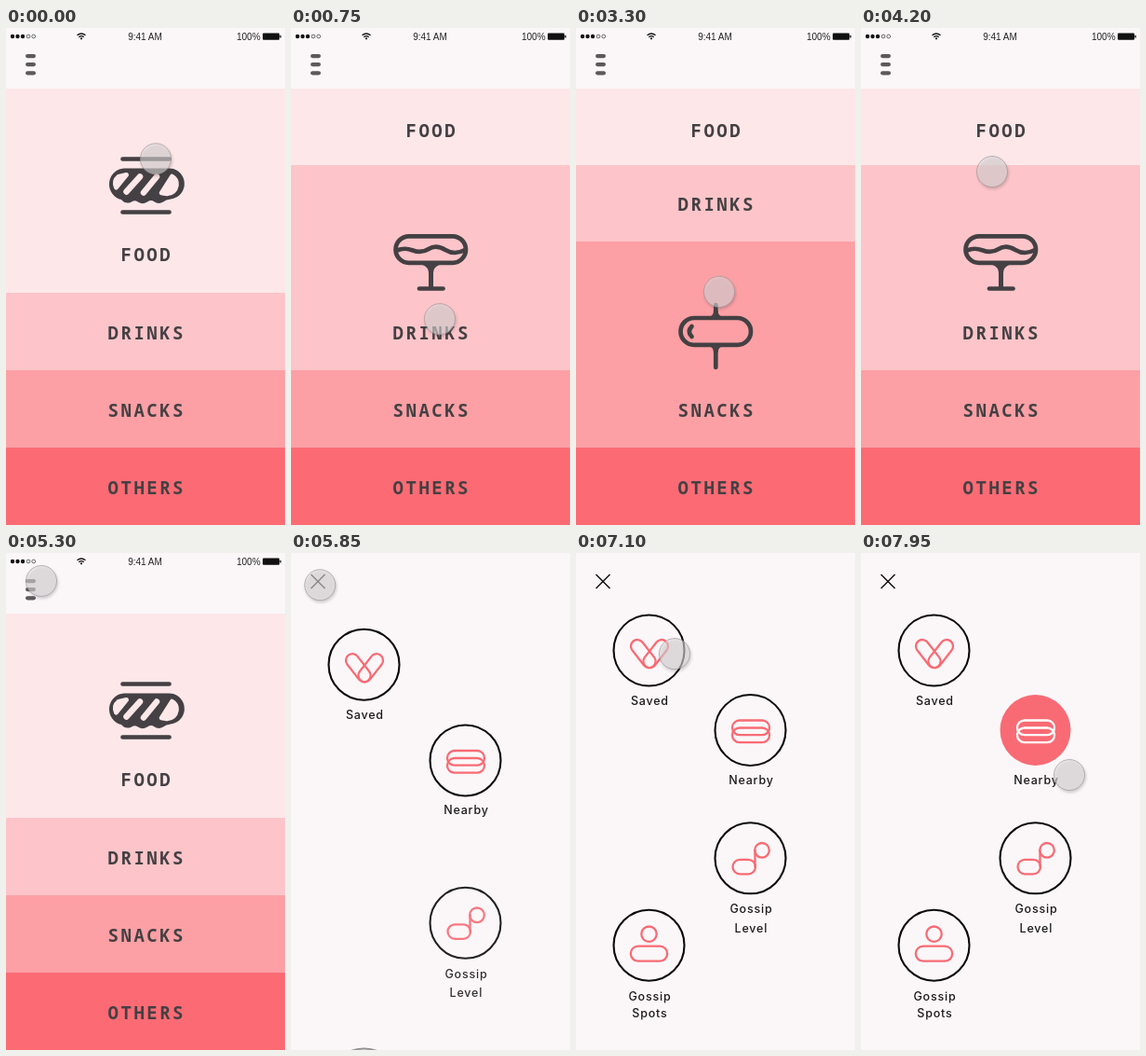
Write an HTML page that moves like this. It is 300 by 533 pixels and loops after 8000 ms.

```html
<!DOCTYPE html>
<html lang="en">
<head>
<meta charset="utf-8">
<title>Food menu</title>
<style>
  html, body { margin: 0; width: 100%; height: 100%; overflow: hidden; background: #fbf7f9; }
  svg { display: block; width: 100%; height: 100%; }
  .status { font: 10px "Liberation Sans", Arial, sans-serif; fill: #222; }
  .label { font: 600 19px "Noto Sans Mono", "DejaVu Sans Mono", monospace; letter-spacing: 2.5px; fill: #444043; text-anchor: middle; }
  .caption { font: 500 12.5px Inter, sans-serif; letter-spacing: .8px; fill: #1c1a1c; text-anchor: middle; }
  .ink { fill: none; stroke: #444043; stroke-width: 4.7; stroke-linecap: round; stroke-linejoin: round; }
  .solid { fill: #444043; stroke: none; }
  .cell { stroke: #fde7e9; fill: #fde7e9; }
  .line { fill: none; stroke-width: 2.3; stroke-linecap: round; }
  #cursor { filter: drop-shadow(1px 2px 1.5px rgba(60, 50, 55, .35)); }
</style>
</head>
<body>
<svg viewBox="0 0 300 533">
  <defs>
    <g id="icon0" class="ink">
      <path d="M125.500 140.500H175.500M125.500 197.500H175.500"/>
      <path class="solid" d="M127 150.500H173.500A16.500 16.500 0 0 1 177 183.500Q172 184 169 186.500Q164 189.500 159 186Q156 184 152 186.500Q146 190 141 186Q138 184 134 187Q128 189 124 184A17 17 0 0 1 127 150.500Z"/>
      <path class="cell" stroke-width="5" d="M121 159.500L129.500 157.500L118.500 171Q115.500 164 121 159.500Z"/>
      <path class="cell" stroke-width="7" style="stroke-width:6.500" d="M129.500 175.500L144 159.500M148 176.500L162 159.500"/>
      <path class="cell" d="M178.500 159Q184 162 183.500 168.500Q182 177 173 178L167 177Z"/>
    </g>
    <g id="icon1" class="ink">
      <rect x="112.500" y="223.300" width="75.500" height="28.600" rx="14.300"/>
      <path d="M114 238.500Q122 235 131 238.500T148 237T166 238T187 238"/>
      <path class="solid" d="M138 253H163Q153 255 153 263V279H148V263Q148 255 138 253Z"/>
      <path d="M138 279.500H163.500"/>
    </g>
    <g id="icon2" class="ink">
      <path d="M150.300 297V310M150.300 342V364"/>
      <path class="solid" d="M142 310Q148 309 148 303H152.600Q152.600 309 159 310ZM142 341Q148 342 148 348H152.600Q152.600 342 159 341Z"/>
      <rect x="112.500" y="311" width="75.500" height="28.800" rx="14.400"/>
      <path d="M124.500 320Q119 325.500 124.500 331"/>
    </g>
    <g id="icon3" class="ink">
      <path d="M121 401C115.500 403 112.500 408 112.500 414A14.500 14.500 0 0 0 127 428.300H173.500A14.600 14.600 0 0 0 173.500 399.200H152Q148.500 399.200 147.500 404Q146 408 142 407Q139 412 133 411Q126 409 125 403Q124 400 121 401Z"/>
      <path class="solid" d="M134 384Q138 388 135.500 390.500Q131 389 134 384ZM141 387Q145 385.500 149 388.500Q146 390 143 392.500Q139.500 391 141 387Z"/>
    </g>
    <g id="saved" class="line">
      <rect x="-7" y="-7" width="34.500" height="14" rx="7" transform="translate(-12.500 -4.500) rotate(52)"/>
      <rect x="-7" y="-7" width="34.500" height="14" rx="7" transform="translate(13.500 -4.500) rotate(128)"/>
    </g>
    <g id="nearby" class="line">
      <rect x="-19.500" y="-10.500" width="40" height="15.700" rx="7.800"/>
      <rect x="-19.500" y="-2.500" width="40" height="15.700" rx="7.800"/>
    </g>
    <g id="level" class="line">
      <circle cx="12.500" cy="-8.500" r="7.800"/>
      <rect x="-19" y="1.500" width="24.500" height="15.500" rx="7.700"/>
      <path d="M5 -8.500V9"/>
    </g>
    <g id="spots" class="line">
      <circle cy="-12" r="8.200"/>
      <rect x="-19.700" y="1" width="39.400" height="16" rx="8"/>
    </g>
  </defs>

  <rect width="300" height="533" fill="#fbf7f9"/>
  <g id="menu"></g>
  <path id="close" d="M21.500 23L36.500 38M36.500 23L21.500 38" stroke="#111" stroke-width="1.500"/>

  <g id="home">
    <rect width="300" height="66" fill="#fbf7f9"/>
    <g fill="#111">
      <circle cx="7" cy="9" r="2.200"/><circle cx="12.500" cy="9" r="2.200"/><circle cx="18" cy="9" r="2.200"/>
      <g fill="none" stroke="#333" stroke-width=".7"><circle cx="24" cy="9" r="1.900"/><circle cx="29.700" cy="9" r="1.900"/></g>
      <path d="M76.500 7.800Q81 4.200 85.500 7.800M78.300 9.700Q81 7.600 83.700 9.700" fill="none" stroke="#111" stroke-width="1.300"/>
      <circle cx="81" cy="11.300" r="1.100"/>
      <rect x="276" y="5.500" width="18" height="7.300" rx="1"/><rect x="294.500" y="7.700" width="1.300" height="3" rx=".6"/>
    </g>
    <text class="status" x="149.500" y="12.500" text-anchor="middle">9:41 AM</text>
    <text class="status" x="248" y="12.500">100%</text>
    <g fill="#5d585c">
      <rect x="21" y="28" width="11" height="4.200" rx="2.100"/>
      <rect x="21" y="37" width="11" height="4.200" rx="2.100"/>
      <rect x="21" y="46.200" width="11" height="4.200" rx="2.100"/>
    </g>
    <g id="panels"></g>
  </g>

  <circle id="cursor" r="16.500" fill="#e3dfe2" fill-opacity=".57" stroke="#9c9699" stroke-opacity=".75" stroke-width=".9"/>
</svg>
<script>
const LOOP = 8000, PINK = '#f96b74';
const $ = id => document.getElementById(id);
const lerp = (a, b, k) => a + (b - a) * k;
const progress = (t, start, length) => {
  const k = Math.min(1, Math.max(0, (t - start) / length));
  return k * k * (3 - 2 * k);
};
const move = (node, x, y) => node.setAttribute('transform', `translate(${x} ${y})`);

// low/high: panel top when the panels above are open/closed; base: label baselines
const panels = [
  { name: 'FOOD', color: '#fde7e9', low: 65, high: 65, base: [250, 117] },
  { name: 'DRINKS', color: '#fdc5c9', low: 284, high: 147, base: [334, 196], raise: 470, lower: 4230 },
  { name: 'SNACKS', color: '#fca0a5', low: 367, high: 229, base: [417, 278], raise: 1120, lower: 3670 },
  { name: 'OTHERS', color: '#fc6b74', low: 450, high: 311, base: [500, 500], raise: 1600, lower: 2960 }
];
$('panels').innerHTML = panels.map((p, i) => `<g>
  <rect width="300" height="533" fill="${p.color}"/>
  <use href="#icon${i}"/>
  <text class="label" x="151.300">${p.name}</text></g>`).join('');
panels.forEach((p, i) => [p.rect, p.icon, p.label] = $('panels').children[i].children);

const items = [
  { icon: 'saved', x: 78.5, y: 104.5, start: 5550, lines: [['Saved', 58.5]] },
  { icon: 'nearby', x: 187.5, y: 190, start: 5620, lines: [['Nearby', 58]] },
  { icon: 'level', x: 187.5, y: 327.3, start: 5690, lines: [['Gossip', 59], ['Level', 79.5]] },
  { icon: 'spots', x: 78.5, y: 420.7, start: 5760, lines: [['Gossip', 59], ['Spots', 77.5]] }
];
$('menu').innerHTML = items.map(m => `<g>
  <circle r="38" fill="none" stroke="#0c0b0c" stroke-width="2.100"/>
  <use href="#${m.icon}" stroke="${PINK}"/>
  <g opacity="0"><circle r="38" fill="${PINK}"/><use href="#${m.icon}" stroke="#fff"/></g>
  ${m.lines.map(([text, y]) => `<text class="caption" x=".9" y="${y}">${text}</text>`).join('')}</g>`).join('');
items.forEach((m, i) => {
  m.node = $('menu').children[i];
  [m.ring, , m.active] = m.node.children;
});

// time, x, y
const path = [
  [0, 161, 140], [550, 160, 298], [750, 160, 312], [1150, 163, 367], [1600, 169, 450],
  [1950, 172, 476], [2400, 172, 476], [2950, 160, 311], [3300, 154, 283], [3680, 152, 229],
  [4250, 140, 147], [4900, 58, 55], [5200, 38, 30], [5450, 38, 30], [6100, 27, 37],
  [6750, 27, 37], [7050, 92, 95], [7400, 188, 185], [7600, 200, 202], [7950, 224, 238], [8000, 226, 241]
];

function cursorAt(t) {
  const i = path.findIndex(key => key[0] > t);
  const [t0, x0, y0] = path[i - 1], [t1, x1, y1] = path[i];
  const k = (t - t0) / (t1 - t0);
  return [lerp(x0, x1, k), lerp(y0, y1, k)];
}

function draw(t) {
  const raised = panels.map(p => p.raise ? progress(t, p.raise, 270) - progress(t, p.lower, 270) : 1);
  panels.forEach((p, i) => {
    const above = raised[i], below = raised[i + 1] || 0;
    const top = lerp(p.low, p.high, above);
    p.rect.setAttribute('y', top);
    p.label.setAttribute('y', lerp(...p.base, below));
    move(p.icon, 0, top - p.high);
    p.icon.setAttribute('opacity', above * (1 - below));
  });

  const leaving = progress(t, 5400, 350);
  $('home').setAttribute('opacity', 1 - leaving);
  $('close').setAttribute('opacity', leaving);

  const highlight = progress(t, 7350, 200);
  for (const m of items) {
    const offset = 400 * Math.exp(-Math.max(0, t - m.start) / 92);
    move(m.node, m.x, m.y + offset);
    m.node.setAttribute('opacity', progress(t, m.start, 200));
  }
  items[1].ring.setAttribute('opacity', 1 - highlight);
  items[1].active.setAttribute('opacity', highlight);

  move($('cursor'), ...cursorAt(t));
}

const begin = performance.now();
function frame() {
  draw((performance.now() - begin) % LOOP);
  requestAnimationFrame(frame);
}
frame();
</script>
</body>
</html>
```
